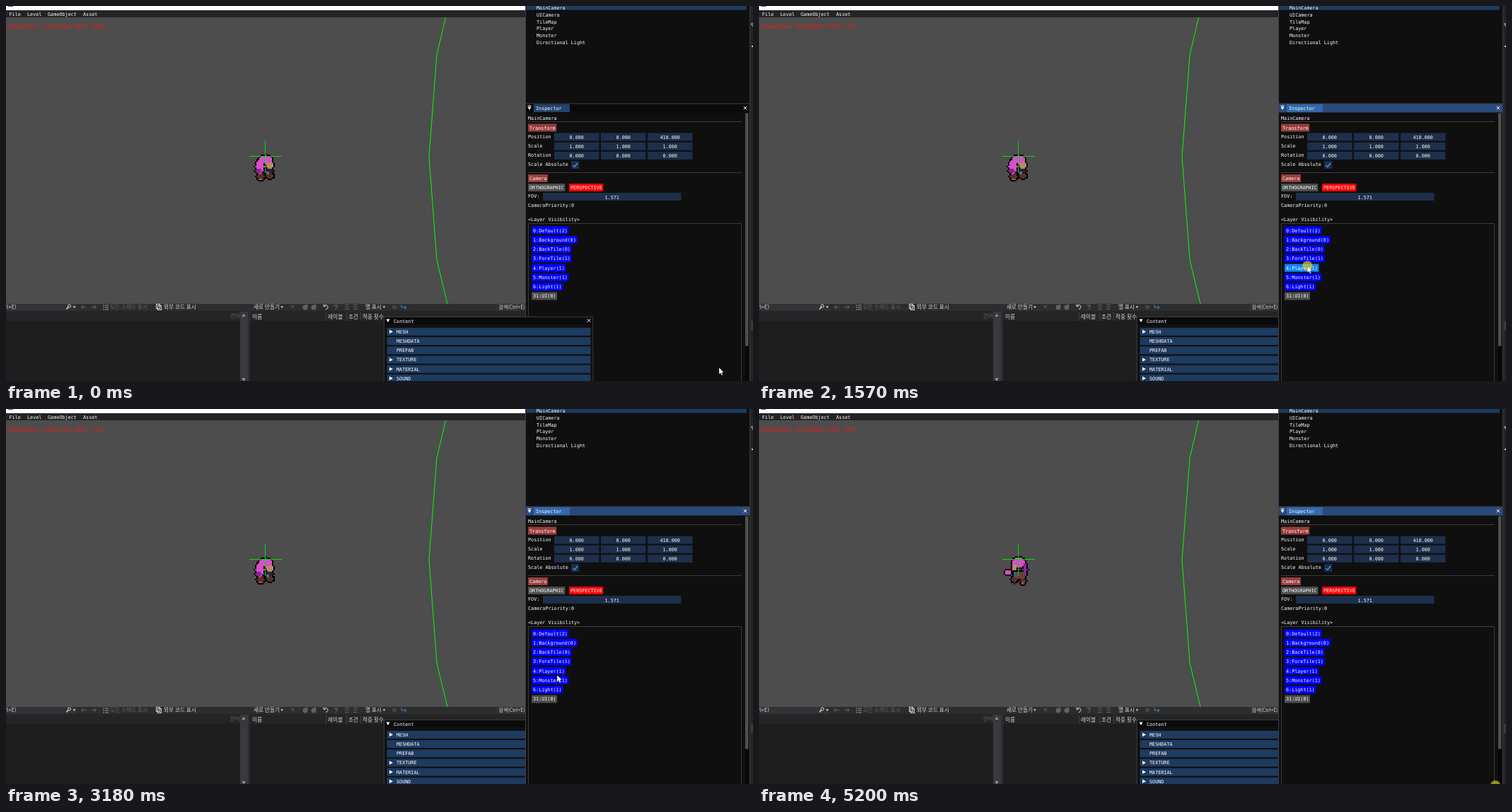
An HTML page with a canvas for the animation above (5350 ms loop, 1056 by 530 pixels).

```html
<!DOCTYPE html>
<html lang="ko">
<head>
<meta charset="utf-8">
<title>Layer visibility</title>
<style>
  html, body { margin: 0; width: 100%; height: 100%; overflow: hidden; background: #0f0f0f; }
  canvas { display: block; }
</style>
</head>
<body>
<canvas id="stage" width="1056" height="530"></canvas>
<script>
const ctx = document.getElementById('stage').getContext('2d');
const LOOP = 5350, STEP = 144.6;
const MONO = '6.75px "DejaVu Sans Mono", monospace';
const KOREAN = '7.7px "Noto Sans CJK KR", "Noto Sans CJK", sans-serif';
const NAVY = '#1e3b60', FIELD = '#1d2f4a', MAROON = '#993d3d', GRAY = '#4d4d4d';

function rect(x, y, w, h, color) {
  ctx.fillStyle = color;
  ctx.fillRect(x, y, w, h);
}
function text(str, x, y, color = '#fff', font = MONO, align = 'left') {
  ctx.font = font;
  ctx.textAlign = align;
  ctx.fillStyle = color;
  ctx.fillText(str, x, y + 2.5);
}
function path(points, color, filled, width = 1) {
  ctx.beginPath();
  points.forEach(([x, y]) => ctx.lineTo(x, y));
  if (filled) {
    ctx.fillStyle = color;
    ctx.fill();
  } else {
    ctx.strokeStyle = color;
    ctx.lineWidth = width;
    ctx.stroke();
  }
}
function disc(x, y, r, color) {
  ctx.fillStyle = color;
  ctx.beginPath();
  ctx.arc(x, y, r, 0, 7);
  ctx.fill();
}
function ring(x, y, r, color, from = 0, to = 7) {
  ctx.strokeStyle = color;
  ctx.lineWidth = 1;
  ctx.beginPath();
  ctx.arc(x, y, r, from, to);
  ctx.stroke();
}
const down = (x, y, color = '#fff', r = 2.5) =>
  path([[x - r, y - r * .8], [x + r, y - r * .8], [x, y + r]], color, true);
const right = (x, y) => path([[x - 2, y - 2.7], [x + 3, y], [x - 2, y + 2.7]], '#fff', true);
function cross(x, y, color = '#fff', r = 2.2) {
  path([[x - r, y - r], [x + r, y + r]], color);
  path([[x - r, y + r], [x + r, y - r]], color);
}
function button(label, x, y, color) {
  rect(x, y - 5.5, label.length * 4.06 + 3.6, 11, color);
  text(label, x + 2, y);
}

// Character: blobs of [color, x, y, rx, ry] snapped to 2px cells, outlined in black.
const PINK = '#d850c8', PURPLE = '#8e2296', SKIN = '#b98a63', BROWN = '#59302a', BLUE = '#3c5590';
const poses = [
  [[BROWN, 360, 241, 5, 5], [BROWN, 373, 240, 5, 4], ['#2d2138', 371, 233, 6, 5],
   [SKIN, 373, 225, 5, 5], [PINK, 367, 217, 9, 6], [PINK, 359, 227, 6, 10],
   [PURPLE, 357, 233, 4, 3], ['#3b7c86', 370, 236, 3, 2], ['#a45f43', 360, 245, 2, 2]],
  [[BROWN, 360, 243, 4, 4], [BROWN, 374, 240, 4, 4], [PINK, 366, 217, 10, 7],
   [PINK, 354, 229, 3, 7], [PURPLE, 376, 225, 2, 7], [SKIN, 367, 224, 5, 4],
   [BLUE, 367, 234, 7, 5], ['#7b3434', 376, 235, 3, 3], ['#a45f43', 360, 245, 2, 2]],
  [[BROWN, 373, 243, 4, 5], [BROWN, 361, 241, 4, 4], [PINK, 367, 217, 9, 7],
   [PINK, 352, 231, 4, 4], [PURPLE, 376, 227, 3, 9], [SKIN, 361, 224, 4, 4],
   ['#693f35', 369, 235, 7, 5], [BLUE, 362, 234, 3, 4], ['#a45f43', 373, 246, 2, 2]],
  [[BROWN, 367, 238, 12, 6], ['#8f3a35', 369, 245, 3, 3], [PURPLE, 357, 230, 5, 5],
   [PINK, 366, 220, 11, 10], [PINK, 378, 228, 4, 3], ['#2d2138', 366, 235, 9, 2],
   [SKIN, 377, 236, 3, 2], [BLUE, 372, 241, 3, 2]]
];
function blob([color, cx, cy, rx, ry], grow) {
  ctx.fillStyle = color;
  for (let y = 208; y < 250; y += 2)
    for (let x = 346; x < 384; x += 2)
      if (((x + 1 - cx) / (rx + grow)) ** 2 + ((y + 1 - cy) / (ry + grow)) ** 2 <= 1)
        ctx.fillRect(x, y, 2, 2);
}
function character(pose) {
  pose.forEach(part => blob(['#000', ...part.slice(1)], 2));
  pose.forEach(part => blob(part, 0));
}

const readings = ['0.001214, FPS : 658', '0.001607, FPS : 716', '0.001384, FPS : 737',
                  '0.001761, FPS : 714', '0.001301, FPS : 705', '0.001566, FPS : 677'];
const layers = ['0:Default(2)', '1:Background(0)', '2:BackTile(0)', '3:ForeTile(1)',
                '4:Player(1)', '5:Monster(1)', '6:Light(1)', '31:UI(0)'];

// Pointer track: [ms, x, y]
const track = [[0, 1008, 511], [200, 1004, 508], [500, 905, 440], [800, 790, 372], [1012, 776, 358],
               [1300, 775, 367], [2590, 776, 368], [2900, 776, 368], [3181, 779, 376],
               [3475, 786, 387], [3620, 640, 270], [3904, 83, 2], [4050, 56, 4], [4200, 180, 60],
               [4480, 800, 370], [4640, 1019, 461], [4930, 1043, 505], [5206, 1041, 532]];
const presses = [[1400, 1700], [2050, 2250], [2550, 2700], [2900, 3000], [5150, LOOP]];
const hiddenSpans = [[1700, 2250], [2700, 3000]];
const within = (spans, t) => spans.some(([a, b]) => t >= a && t < b);

function pointerAt(t) {
  const next = Math.max(1, track.findIndex(k => k[0] >= t));
  const [t0, x0, y0] = track[next - 1], [t1, x1, y1] = track[next];
  const f = (t - t0) / (t1 - t0);
  return [x0 + (x1 - x0) * f, y0 + (y1 - y0) * f];
}

function drawViewport(t, playerHidden) {
  rect(0, 0, 734, 6, '#fff');
  rect(3, 0, 7, 1, '#555');
  rect(0, 6, 734, 10, '#242424');
  [['File', 4.5], ['Level', 30], ['GameObject', 59], ['Asset', 109]]
    .forEach(([label, x]) => text(label, x, 11.5));
  rect(0, 16, 734, 405, GRAY);
  path([[621.5, 16], [609, 69], [598, 213], [609, 359], [624, 421]], '#0f0');
  if (!playerHidden) character(poses[Math.floor((t + 50) / 200) % 4]);
  path([[344, 212.5], [390, 212.5]], '#0d0');
  path([[366.5, 190], [366.5, 236]], '#0d0');
  text('DeltaTime : ' + readings[Math.floor(t / 1000 + .7)], 3, 29, '#f01818',
       '9.27px "Liberation Sans", Arial, sans-serif');
}

function drawDebugger() {
  const light = '#d8d8d8', dim = '#626266';
  rect(0, 421, 734, 109, '#1e1e1e');
  rect(0, 421, 734, 10.5, '#2d2d30');
  rect(0, 421, 99, 10, '#333337');
  rect(694, 421, 40, 10, '#333337');
  rect(0, 432, 331, 13, '#252526');
  rect(345, 432, 389, 13, '#252526');
  rect(331, 432, 11, 98, '#3a3a3e');
  rect(342, 421, 3, 109, '#2d2d30');
  path([[333.5, 439], [336, 435], [338.5, 439]], '#999', true);
  down(336, 528, '#999');

  const ko = (str, x, y, color = light, font = KOREAN) => text(str, x, y, color, font);
  ko('rl+E)', -2, 425);
  ring(89.5, 424, 2, light);
  path([[88, 425.5], [85.5, 428.5]], light, false, 1.5);
  down(96.5, 425.5, light, 1.7);
  for (const [x, dir] of [[110, -1], [124, 1]]) {
    path([[x - 3.5, 425.5], [x + 3.5, 425.5]], dim);
    path([[x + dir * .5, 422.5], [x + dir * 3.5, 425.5], [x + dir * .5, 428.5]], dim);
  }
  for (let y = 422; y < 430; y += 3) {
    rect(137, y, 2, 2, dim);
    rect(140, y, 5, 2, dim);
  }
  ko('모든 스레드 표시', 147, 425, dim);
  ctx.strokeStyle = light;
  ctx.lineWidth = 1;
  ctx.strokeRect(212.5, 421.5, 5, 6);
  ctx.strokeRect(214.5, 423.5, 5, 6);
  ko('외부 코드 표시', 223, 425);
  ko('새로 만들기', 350, 425);
  down(390, 425.5, light, 1.7);
  cross(405, 425, dim);
  for (const x of [423, 435]) {
    disc(x, 426, 3.5, dim);
    disc(x + 2, 423, 1.5, dim);
  }
  for (const [x, dir, color] of [[452, 1, light], [465, -1, dim]]) {
    path([[x - 3 * dir, 421.5], [x - 3 * dir, 424.5], [x, 424.5]], color);
    ring(x, 425.5, 3, color, -2.3, 1.6);
  }
  for (const x of [482, 494])
    for (let y = 422; y < 430; y += 3) rect(x - 3, y, 6, 1, dim);
  ko('열 표시', 508, 425);
  down(534.5, 425.5, light, 1.7);
  rect(546, 423, 6, 5, '#444448');
  path([[559, 422], [559, 426], [566, 426]], '#4d86b8');
  path([[563.5, 423.5], [566, 426], [563.5, 428.5]], '#4d86b8');
  ko('검색(Ctrl+E)', 696.5, 425, light, KOREAN.replace('7.7', '7'));

  ko('언어', 317, 438, dim);
  [['이름', 348], ['레이블', 455], ['조건', 484], ['적중 횟수', 504]]
    .forEach(([label, x]) => ko(label, x, 439));
  for (const x of [452, 481, 501]) rect(x, 433, 1, 12, '#3f3f46');
}

function drawContent() {
  rect(535, 439, 295, 91, '#101010');
  rect(535, 439, 295, 11, '#0a0a0a');
  path([[830, 530], [829.5, 439.5], [534.5, 439.5], [534.5, 530]], '#3a3a40');
  down(540, 444.5);
  text('Content', 548, 445);
  cross(824, 444.5);
  ['MESH', 'MESHDATA', 'PREFAB', 'TEXTURE', 'MATERIAL', 'SOUND'].forEach((label, i) => {
    const y = 460.3 + i * 13.2;
    rect(538.5, y - 5.5, 288, 11, NAVY);
    if (i < 1 || i > 2) right(544, y);
    text(label, 552, y);
  });
}

function drawOutliner() {
  rect(734, 0, 318, 138, '#0f0f0f');
  rect(735, 0, 312, 5.5, NAVY);
  ['MainCamera', 'UICamera', 'TileMap', 'Player', 'Monster', 'Directional Light']
    .forEach((label, i) => text(label, 750, 2.5 + i * 9.8));
  rect(1052, 0, 4, 530, '#252526');
  rect(1051, 0, 1, 530, '#3a3a40');
  path([[1056, 25], [1053.5, 25], [1056, 29]], '#ccc');
  rect(1054, 56, 2, 2, '#ccc');
  rect(1053, 445, 3, 13, '#3a3a40');
}

function drawInspector(focused, playerHidden, pointer, pressed) {
  rect(734, 138, 317, 392, '#0f0f0f');
  rect(734, 138, 317, 12.5, focused ? '#294a7a' : '#0a0a0a');
  rect(734, 137.5, 317, 1, '#3f3f46');
  rect(734, 0, 1, 530, '#3f3f46');
  rect(746, 139, 51, 11, focused ? '#3369ad' : '#23436c');
  rect(737.5, 140.5, 5, 1, '#fff');
  down(740, 144.5);
  text('Inspector', 749, 144.5);
  cross(1045, 144);
  rect(1045, 151, 5, 379, '#080808');
  rect(1045, 151.5, 4.5, 329, '#4f4f4f');

  text('MainCamera', 738, 158);
  rect(738, 163, 302, 1, '#3a3a42');
  button('Transform', 738, 172, MAROON);
  [['Position', '0.000', '0.000', '410.000'], ['Scale', '1.000', '1.000', '1.000'],
   ['Rotation', '0.000', '0.000', '0.000']].forEach(([label, ...values], row) => {
    const y = 185 + row * 13.2;
    text(label, 738, y - 1);
    values.forEach((value, col) => {
      rect(775 + col * 66, y - 5.5, 63.5, 11, FIELD);
      text(value, 806.7 + col * 66, y + .3, '#fff', MONO, 'center');
    });
  });
  text('Scale Absolute', 738, 223.5);
  rect(799, 219, 11, 11, FIELD);
  path([[801.5, 225], [803.7, 227.5], [808, 222]], '#4296fa', false, 1.4);
  rect(738, 235, 302, 1, '#3a3a42');
  button('Camera', 738, 243.5, MAROON);
  button('ORTHOGRAPHIC', 738, 256.5, GRAY);
  button('PERSPECTIVE', 796, 256.5, '#f00');
  text('FOV:', 738, 268.5);
  rect(759, 264, 195.5, 11, FIELD);
  text('1.571', 856.7, 270, '#fff', MONO, 'center');
  text('CameraPriority:0', 738, 281.5);
  text('<Layer Visibility>', 738, 301);
  path([[738.5, 530], [738.5, 307.5], [1039.5, 307.5], [1039.5, 530]], '#3a3a42');

  layers.forEach((label, i) => {
    const y = 317 + i * 13.28;
    const hovered = Math.abs(pointer[1] - y) < 5.6 && pointer[0] > 743 &&
                    pointer[0] < 746 + label.length * 4.06;
    const off = i === 7 || (i === 4 && playerHidden);
    button(label, 743, y, hovered ? (pressed ? '#0f87fa' : '#4296fa') : off ? GRAY : '#00f');
  });
}

function drawPointer([x, y], pressed) {
  if (pressed) disc(x, y, 7, 'rgba(225, 215, 40, .65)');
  const shape = [[0, 0], [0, 9.5], [2.2, 7.6], [3.7, 11], [5.3, 10.3], [3.9, 7], [6.7, 6.8], [0, 0]]
    .map(([dx, dy]) => [x + dx, y + dy]);
  path(shape, '#fff', true);
  path(shape, 'rgba(0, 0, 0, .6)', false, .5);
}

function render(now) {
  const step = Math.min(36, Math.floor((now % LOOP + 24) / 144.8));
  const t = step * STEP;
  const pointer = pointerAt(t), pressed = within(presses, t);
  const hidden = within(hiddenSpans, t), focused = t >= 1400;
  drawViewport(t, hidden);
  drawDebugger();
  if (focused) drawContent();
  drawOutliner();
  drawInspector(focused, hidden, pointer, pressed);
  if (!focused) drawContent();
  drawPointer(pointer, pressed);
}

const start = performance.now();
function tick() {
  render(performance.now() - start);
  requestAnimationFrame(tick);
}
tick();
</script>
</body>
</html>
```
